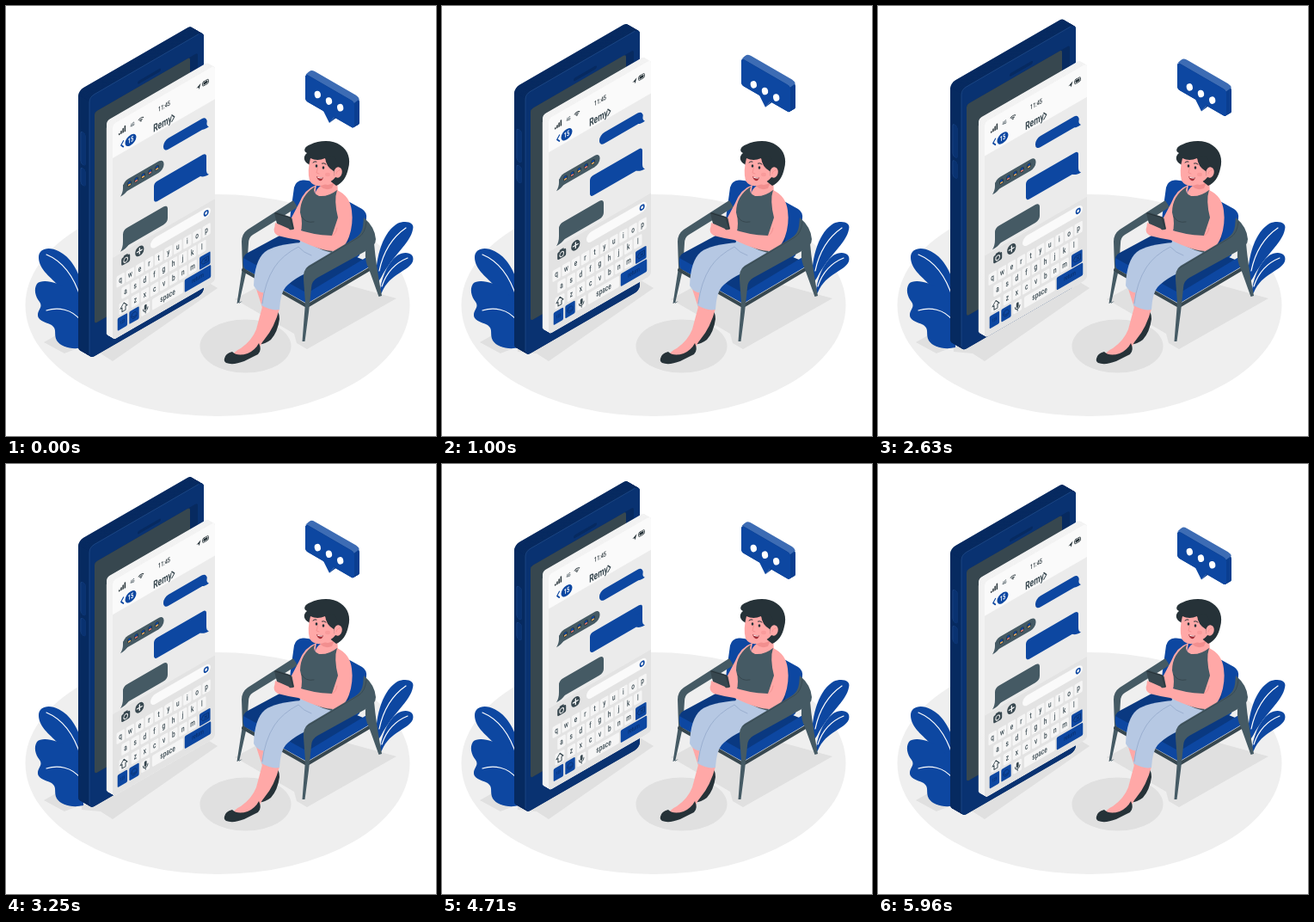
These frames come from a looping animation (500x500 px, 6 s). An HTML page with a canvas:

```html
<!DOCTYPE html>
<html lang="en">
<head>
<meta charset="utf-8">
<title>Chat</title>
<style>
html, body { margin: 0; width: 100%; height: 100%; overflow: hidden; background: #fff; }
canvas { display: block; width: 500px; height: 500px; }
</style>
</head>
<body>
<canvas id="stage"></canvas>
<script>
const canvas = document.getElementById('stage');
const ctx = canvas.getContext('2d');
const dpr = window.devicePixelRatio || 1;
canvas.width = canvas.height = 500 * dpr;

const BLUE = '#0d47a1', NAVY = '#0a3981', DARK = '#093271', DEEP = '#072a60';
const GREY = '#455a64', SLATE = '#37474f', INK = '#263238';
const SKIN = '#ffa8a7', BLUSH = '#f28f8f', DENIM = '#b6c8e3';
const FONT = 'Roboto, Inter, sans-serif';
const SLOPE = Math.tan(Math.PI / 6);
const FORESHORTEN = 0.68;

function fill(d, color) {
  ctx.fillStyle = color;
  ctx.fill(new Path2D(d));
}

function line(d, color, width) {
  ctx.strokeStyle = color;
  ctx.lineWidth = width;
  ctx.stroke(new Path2D(d));
}

function oval(x, y, rx, ry, color, turn = 0) {
  ctx.fillStyle = color;
  ctx.beginPath();
  ctx.ellipse(x, y, rx, ry, turn, 0, Math.PI * 2);
  ctx.fill();
}

function box(x, y, w, h, r, color) {
  ctx.fillStyle = color;
  ctx.beginPath();
  ctx.roundRect(x, y, w, h, r);
  ctx.fill();
}

function label(str, x, y, size, color = SLATE, weight = 500) {
  ctx.save();
  ctx.translate(x, y);
  ctx.scale(FORESHORTEN, 1);
  ctx.font = `${weight} ${size}px ${FONT}`;
  ctx.textAlign = 'center';
  ctx.textBaseline = 'middle';
  ctx.fillStyle = color;
  ctx.fillText(str, 0, 0);
  ctx.restore();
}

// Draws on an isometric plane whose corner is at x, y
function plane(x, y, slope, draw) {
  ctx.save();
  ctx.transform(1, slope, 0, 1, x, y);
  draw();
  ctx.restore();
}

// Sweeps a rounded slab from its back face to its front face
function slab(x, y, w, h, r, slope, dx, dy, color) {
  const n = Math.ceil(Math.abs(dx) * 2);
  for (let i = 0; i <= n; i++) {
    plane(x + dx * (1 - i / n), y + dy * (1 - i / n), slope, () => box(0, 0, w, h, r, color));
  }
}

// Linear up and down, 0 to 1 to 0
function bounce(t, period) {
  return 1 - Math.abs(1 - 2 * (t % period) / period);
}

function floating(dy, draw) {
  ctx.save();
  ctx.translate(0, dy);
  draw();
  ctx.restore();
}

function floor() {
  oval(246, 348, 223.5, 129, '#efefef');
  fill('M44 391L88 366V402L110 404L124 413L246 328L228 317L88 396L68 404Z', '#e0e0e0');
  fill('M266 341L330 306L454 340L350 399L338 392L335 381Z', '#e0e0e0');
  oval(278.5, 395.5, 53, 31, '#e0e0e0');
}

function plants() {
  fill('M90 370C84 350 72 336 60 324C50 314 38 305 38 292C38 282 50 279 61 285C75 292 84 306 90 330Z', BLUE);
  line('M47 289C64 296 78 311 87 340', '#fff', 1.2);
  fill('M90 397C78 400 64 397 59 389C55 381 60 376 53 371C45 367 36 366 37 358C38 352 43 350 39 344C34 338 32 329 36 323C42 317 60 321 71 329C80 336 85 348 90 360Z', BLUE);
  line('M47 354C60 350 77 352 87 366', '#fff', 1.2);
  fill('M430 325C429 288 440 262 455 253C464 249 476 251 473 260C470 276 450 289 436 316Z', BLUE);
  line('M465 258C449 269 439 284 434 308', '#fff', 1.2);
  fill('M434 337C436 318 442 300 455 290C464 284 476 287 473 297C468 309 447 310 437 333Z', BLUE);
  line('M467 293C452 299 442 311 437 326', '#fff', 1.2);
}

function phone() {
  const h = 304.5;
  slab(97, 106, 133, h, 6, -SLOPE, -13, -7.5, DEEP);
  plane(97, 106, -SLOPE, () => {
    box(0, 0, 133, h, 6, DARK);
    ctx.strokeStyle = '#2a5696';
    ctx.lineWidth = 0.5;
    ctx.beginPath();
    ctx.moveTo(0, h - 6);
    ctx.lineTo(0, 6);
    ctx.quadraticCurveTo(0, 0, 6, 0);
    ctx.lineTo(127, 0);
    ctx.stroke();
    box(6, 21, 120, 246, 3, DEEP);
    box(6, 21, 111, 246, 3, SLATE);
    box(56, 14, 27, 3.6, 1.8, DEEP);
  });
  for (const [y, len] of [[145, 38], [187, 20]]) {
    plane(86.5, y, SLOPE, () => {
      box(0, 0, 6, len, 3, '#1a4586');
      box(0.8, 0.3, 5.2, len - 0.6, 2.6, DARK);
    });
  }
}

function key(x, y, str, w = 9.4) {
  box(x - w / 2, y - 6.6, w, 13.2, 1.6, '#f5f5f5');
  if (str) label(str, x, y, 9.5);
}

function blueKey(x, y, w) {
  box(x - w / 2, y - 7.3, w, 14.6, 1.4, BLUE);
}

function keyRow(chars, x, y) {
  [...chars].forEach((c, i) => key(x + i * 11.1, y, c));
}

function statusBar() {
  for (let i = 0; i < 4; i++) box(7 + i * 2.2, 13.5 - i * 1.7, 1.5, 2 + i * 1.7, 0.3, INK);
  label('4G', 23, 12.5, 6);
  ctx.strokeStyle = INK;
  ctx.lineWidth = 1;
  for (const r of [2, 4]) {
    ctx.beginPath();
    ctx.arc(33, 14, r, -2.35, -0.8);
    ctx.stroke();
  }
  oval(33, 13.7, 0.8, 0.8, INK);
  label('11:45', 60, 12.5, 8, INK);
  fill('M97.5 13L102.5 10L100.5 16L99.8 13.4Z', INK);
  ctx.lineWidth = 0.7;
  ctx.beginPath();
  ctx.roundRect(104.5, 10, 7, 5, 1.5);
  ctx.stroke();
  box(105.5, 11, 5, 3, 0.7, INK);
}

function header() {
  line('M12.5 25L9.8 28.5L12.5 32', BLUE, 1.4);
  box(14.5, 23, 13, 12, 6, BLUE);
  label('15', 21, 29.2, 8.5, '#fff', 700);
  label('Remy', 58, 31.5, 12.5, SLATE, 700);
  line('M68.8 27.5L71.8 31.3L68.8 35', SLATE, 1.2);
}

function messages() {
  box(59, 52, 50.5, 13, 6, BLUE);
  fill('M103 56L109.5 57C109 61 109.5 64 112 66C108 66.5 105 66 103 64Z', BLUE);

  box(12, 72.5, 47.5, 13.3, 6, GREY);
  fill('M12 76V80C12 83 11 86 9 88C13 88.5 16 87 18 85L20 78Z', GREY);
  for (let i = 0; i < 5; i++) {
    const x = 19.5 + i * 8;
    oval(x, 79, 2.4, 3, INK);
    oval(x, 77.8, 1.6, 1.3, BLUE);
    box(x - 1.6, 79.3, 3.2, 1.7, 0.6, i % 2 ? '#ed7d73' : '#f0b266');
  }

  box(48, 94.5, 61, 23.5, 4, BLUE);
  fill('M102 104H109V114C109 118 110 120 112 121.5C108 122 104 120 102 118Z', BLUE);

  box(12, 128.5, 52, 21, 5, GREY);
  fill('M12 134V142C12 147 11 150 9 152C13 152.5 17 151 19 149V138Z', GREY);
}

function inputRow() {
  box(10.2, 160.5, 10, 8.8, 1.8, SLATE);
  box(12.7, 158.8, 5, 3, 1, SLATE);
  oval(15.2, 165, 2.9, 3.2, '#e6e6e6');
  oval(15.2, 165, 1.8, 2.1, SLATE);
  oval(31.3, 164, 5.1, 5.7, SLATE);
  line('M28.4 164H34.2M31.3 160.8V167.2', '#fff', 1.3);
  box(44, 158.8, 70, 11.6, 5.8, '#fafafa');
  ctx.strokeStyle = BLUE;
  ctx.lineWidth = 1.6;
  ctx.beginPath();
  ctx.ellipse(108.7, 164.6, 2.2, 2.5, 0, 0, Math.PI * 2);
  ctx.stroke();
}

function keyboard() {
  keyRow('qwertyuiop', 9.2, 185);
  keyRow('asdfghjkl', 15, 201.5);
  key(13, 218.3, '', 11);
  line('M13 213.5L17 218.5H15V223H11V218.5H9Z', SLATE, 1);
  keyRow('zxcvbnm', 26.4, 218.3);
  blueKey(107.3, 219, 12.6);
  line('M103 219L105.5 216H111.5V222H105.5ZM107 217.8L109.8 220.3M109.8 217.8L107 220.3', '#08306f', 0.7);
  blueKey(11.4, 235, 11.4);
  label('123', 11.4, 235, 5, '#08306f');
  blueKey(25, 235, 11.4);
  line('M21.8 235A3.2 3.6 0 1 0 28.2 235A3.2 3.6 0 1 0 21.8 235M23.4 236Q25 238.5 26.6 236', '#08306f', 0.7);
  key(38.2, 235, '', 10);
  box(36.8, 230, 2.8, 6.4, 1.4, SLATE);
  line('M35.4 234.5Q35.6 237.8 38.2 237.8Q40.8 237.8 41 234.5M38.2 237.8V240', SLATE, 0.9);
  key(64, 235, 'space', 36);
  blueKey(99, 235, 30.5);
  label('return', 99, 234.6, 7.5, '#08306f');
}

function screen() {
  slab(124, 137.5, 119, 251, 4, -SLOPE, -7, -4, '#f2f2f2');
  line('M117.2 142V381', '#e2e2e2', 0.6);
  plane(124, 139, -SLOPE, () => {
    box(0, -1.5, 119, 251, 4, '#ebebeb');
    box(0, -1.5, 119, 39.5, [4, 4, 0, 0], '#fafafa');
    box(0, 154, 119, 95.5, [0, 0, 4, 4], '#e3e3e3');
    statusBar();
    header();
    messages();
    inputRow();
    keyboard();
  });
}

function bubble(lift, dotLift) {
  floating(-lift, () => {
    slab(348, 79, 57, 31, 3.5, SLOPE, 6, -3.5, '#0b3f90');
    fill('M348.4 80.5Q349 78.5 354 75.3Q356 74.5 359 76.1L407 103.7Q410.5 106 410.8 108.5L404.7 113Q404 111 401 109.3L353 81.5Q349 79.3 348.4 80.5Z', '#3d6cb4');
    plane(348, 79, SLOPE, () => box(0, 0, 57, 31, 3.5, BLUE));
    fill('M368 120L376 136L382.5 128.5Z', BLUE);
    fill('M376 136L382.5 128.5L384 130Z', '#0b3f90');
  });
  floating(-dotLift, () => {
    for (let i = 0; i < 3; i++) oval(362.3 + i * 13.2, 103 + i * 7.6, 3.6, 4.3, '#fff', -0.2);
  });
}

function chairBack() {
  fill('M331 240L335 211Q337 203 345 202.5Q352 202 358 205L414 236Q420 240 419 247L411 290L394 306L328 268Z', BLUE);
  fill('M380 225L402 238L396 310L372 290Z', NAVY);
  fill('M275 343L268.5 346L275 304L274 274Q274 265 281 260L334 226L339 234L287 266Q282 269 282 276L280 306L271 346Z', GREY);
  fill('M276 294Q276 290 281 287L320 266L408 292L420 297L356 332L346 335L279 300Z', NAVY);
  fill('M276 293L345 331Q350 334 355 331L421 291V304L350 346L278 306Q275 303 276 293Z', BLUE);
  line('M276 307L350 349L426 304', SLATE, 4);
}

function chairFront() {
  fill('M344.5 390L348 345L346 318Q345 307 352 302L406 270Q414 265 415 256L416 246Q429 257 430 271Q430 279 420 284L362 316Q355 320 355 328L352 356L347.5 390Z', GREY);
  fill('M418 285L428 276Q430 300 437 337L433.5 338L422 306Q417 297 418 285Z', GREY);
  line('M350 305L410 269Q418 264 419 251', SLATE, 0.8);
}

function legs() {
  fill('M291 329L310 333Q313 349 313 361L306 384L295 392L293 386Q301 370 299 354Z', SKIN);
  fill('M313 353Q318 355 318 364Q316 379 308 388Q300 394 295 393Q293 389 299 386Q308 381 309 364Z', INK);
  fill('M345 275Q313 277 301 286Q289 296 288 325Q290 330 297 333L313 335L345 300Z', DENIM);
  fill('M299 346L318 352Q312 374 301 387Q295 394 291 406L264 408Q264 402 273 398Q286 389 291 376Z', SKIN);
  fill('M254 410Q255 404 263 402Q269 408 281 404Q290 400 294 392Q298 400 293 405Q285 409 277 413Q264 418 256 415Q253 413 254 410Z', INK);
  fill('M343 270L388 284Q384 297 366 304Q338 313 325 327Q319 334 318 353Q309 355 297 348Q300 321 312 304Q321 290 340 280Z', DENIM);
  line('M298 346Q301 321 312 304Q321 290 340 280Q346 287 355 290', '#94a9cb', 0.8);
}

function torso() {
  fill('M361 208Q347 213 341 229L331 248Q326 256 330 261L342 263L356 238Z', SKIN);
  fill('M367 200L366 209Q360 213 359 220Q371 228 386 219L385 200Z', SKIN);
  fill('M366 205Q374 211 382 205L379 212Q371 215 366 210Z', BLUSH);
  fill('M359 210Q356 218 364 221Q375 222 385 214Q389 218 390 229L388 258L379 287Q355 281 342 267Q346 253 342 240Q342 221 359 210Z', GREY);
  line('M344 245Q348 253 358 251', SLATE, 1);
  fill('M385 214Q400 221 402 238Q404 253 399 268Q393 284 382 285Q367 285 340 272Q327 270 316 267Q310 263 312 258Q315 251 322 255L337 259Q355 266 379 267L386 246Q381 226 385 214Z', SKIN);
  line('M379 267Q384 265 385 258', BLUSH, 0.8);
  fill('M312 241Q314 239 318 241L330 245Q333 246 333 249L335 259Q333 261 329 260L319 257Q316 256 315 253Z', SLATE);
  line('M313 241L330 246L334 259', INK, 1);
  fill('M313 252L320 255L329 259Q332 263 328 265L317 264Q311 261 313 252Z', SKIN);
}

function head() {
  fill('M352 184C346 181 345 175 350 171C345 169 347 163 354 161C364 156 380 155 389 162C398 168 401 178 398 189C396 199 391 206 384 209L370 198Z', INK);
  fill('M354 177Q350 192 353 203Q357 210 366 209Q378 206 384 198L383 185Q376 185 371 177Q362 181 354 177Z', SKIN);
  fill('M371 176Q372 187 381 192L382 198L388 186L381 174Z', INK);
  oval(386, 193.5, 4.7, 6.2, SKIN, 0.2);
  line('M384 195Q385 191 388 191', BLUSH, 0.8);
  oval(361, 186, 1.3, 1.8, INK);
  oval(369, 188, 1.3, 1.8, INK);
  line('M357 182Q359 180 361 181M367.5 183Q370 182 372 184', INK, 1);
  line('M362.5 188L361 194L364 195', BLUSH, 0.9);
  fill('M361 198Q365 200 369 199Q368 204 364.5 203Q362 202 361 198Z', '#a32f38');
  fill('M362 198.4Q365 200 368.5 199.2L368 200.3Q365 201 362.5 199.8Z', '#fff');
  oval(374, 196, 3, 2.2, '#f99b9b');
}

function frame(now) {
  const t = now % 6000;
  ctx.setTransform(dpr, 0, 0, dpr, 0, 0);
  ctx.lineCap = ctx.lineJoin = 'round';
  ctx.fillStyle = '#fff';
  ctx.fillRect(0, 0, 500, 500);
  floor();
  plants();
  floating(-10 * bounce(t, 6000), phone);
  floating(-10 * bounce(t, 3000), screen);
  chairBack();
  legs();
  torso();
  head();
  chairFront();
  const b = bounce(t, 1500);
  bubble(27.5 * b, 17.5 * b);
}

const start = performance.now();
function tick() {
  frame(performance.now() - start);
  requestAnimationFrame(tick);
}
tick();
</script>
</body>
</html>
```
